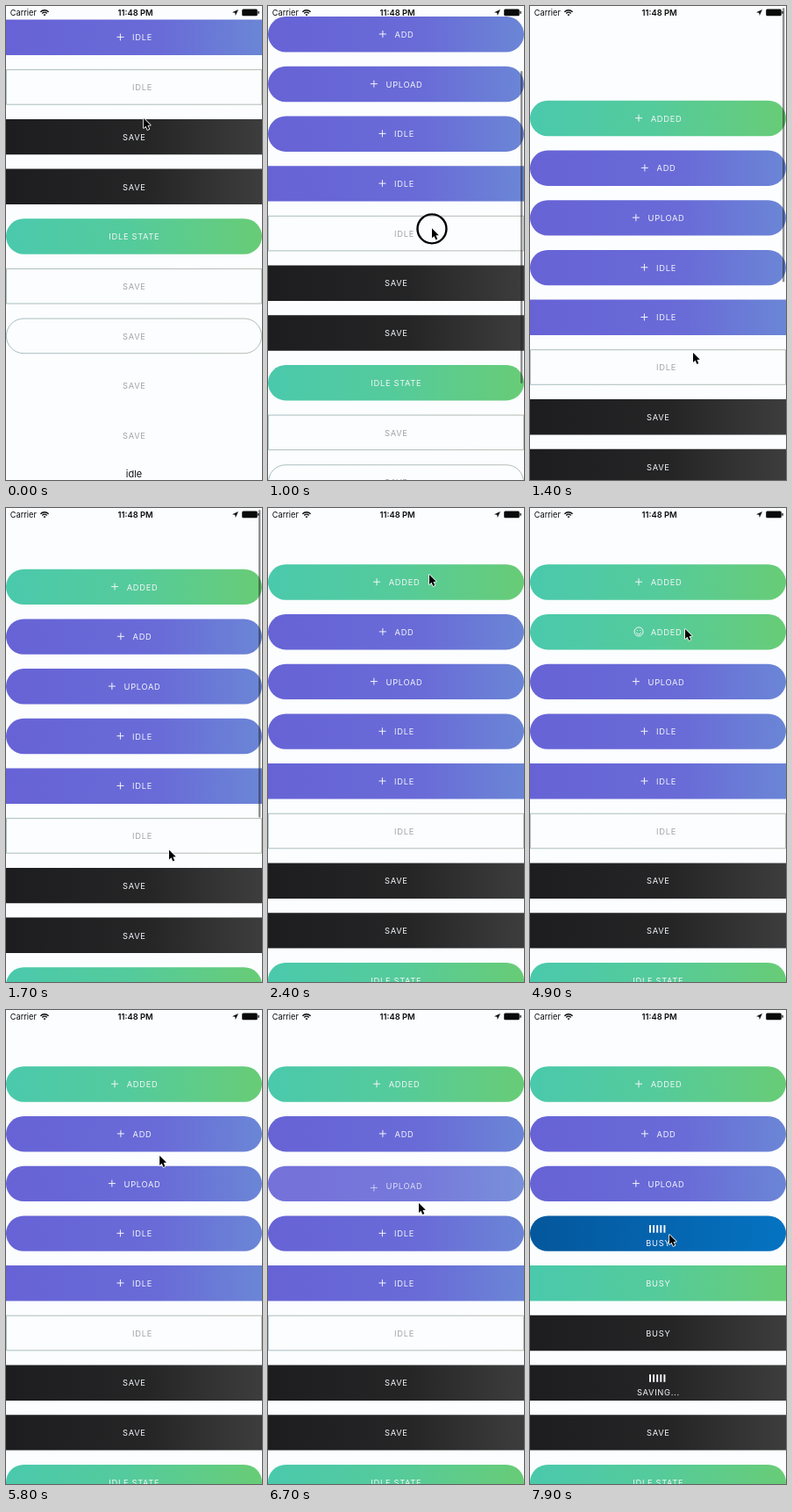
Animation, 292 px wide and 540 px high, one loop 8000 ms. Source, as an HTML page with a canvas:

```html
<!DOCTYPE html>
<html lang="en">
<head>
<meta charset="utf-8">
<title>Button states</title>
<style>
html, body { margin: 0; width: 100%; height: 100%; overflow: hidden; background: #fbfdfe; }
canvas { display: block; width: 292px; height: 540px; }
</style>
</head>
<body>
<canvas id="stage"></canvas>
<script>
const W = 292, H = 540, LOOP = 8000;
const PITCH = 56.7, BTN_H = 40.4, REST = 64.3;
const FONT = 'Inter, Roboto, sans-serif';
const canvas = document.getElementById('stage');
const ctx = canvas.getContext('2d');
const dpr = window.devicePixelRatio || 1;
canvas.width = W * dpr;
canvas.height = H * dpr;

const clamp = v => Math.max(0, Math.min(1, v));
const lerp = (a, b, p) => a + (b - a) * p;
const linear = p => p;
const easeOut = p => 1 - (1 - p) ** 2;
const easeOut3 = p => 1 - (1 - p) ** 3;
const smooth = p => p * p * (3 - 2 * p);
const span = (t, from, length) => clamp((t - from) / length);

// Keys are [time, value, easing into this key]
function track(keys, t) {
  let i = 1;
  while (i < keys.length - 1 && t > keys[i][0]) i++;
  const [t0, a] = keys[i - 1], [t1, b, ease = smooth] = keys[i];
  const p = ease(clamp((t - t0) / (t1 - t0)));
  return Array.isArray(a) ? a.map((v, k) => lerp(v, b[k], p)) : lerp(a, b, p);
}

const scrollKeys = [
  [0, -211.3], [80, -211.3], [1000, -45, smooth], [1400, 108, linear], [2000, REST, easeOut3]
];
const cursorKeys = [
  [0, [157, 128]], [80, [157, 128]], [1000, [187, 253]], [1400, [186, 395], linear],
  [1650, [186, 395]], [2300, [184, 76]], [3000, [184, 76]], [3700, [177, 138]],
  [5450, [177, 138]], [6200, [173, 200]], [6480, [173, 200]], [6700, [172, 220]],
  [7200, [159, 256]], [8000, [159, 256]]
];
const presses = [[950, 1380], [4050, 4170], [5200, 5320], [6370, 6480], [7240, 7350]];

const fills = {
  violet: [[0, '#6763d6'], [0.6, '#696bd7'], [1, '#6b86d6']],
  green: [[0, '#4ac9ac'], [0.5, '#55cb9b'], [1, '#68cc76']],
  dark: [[0, '#1d1d1f'], [0.55, '#252526'], [1, '#3d3d3d']],
  blue: [[0, '#04579c'], [0.5, '#0564ae'], [1, '#0573c2']],
  line: [[0, '#93acb0'], [1, '#a3ab9f']]
};

const look = (label, fill, opt = {}) => ({ label, fill, ink: '#f4f6fa', ...opt });
const grey = '#a1a4a3';

const add = look('ADD', 'violet', { icon: 'plus', round: true });
const added = look('ADDED', 'green', { icon: 'smile', round: true });
const upload = look('UPLOAD', 'violet', { icon: 'plus', round: true });

// Each button: first look, then [time, next look] changes
const buttons = [
  { first: look('ADDED', 'green', { icon: 'plus', round: true }) },
  { first: add, changes: [[4120, added], [5270, add]] },
  { first: upload, changes: [[6480, upload]], flash: 6400 },
  { first: look('IDLE', 'violet', { icon: 'plus', round: true }),
    changes: [[7300, look('BUSY', 'blue', { bars: true, round: true })]] },
  { first: look('IDLE', 'violet', { icon: 'plus' }), changes: [[7300, look('BUSY', 'green')]] },
  { first: look('IDLE', 'line', { ink: grey, icon: 'none', outline: true }),
    changes: [[7300, look('BUSY', 'dark')]] },
  { first: look('SAVE', 'dark'), changes: [[7300, look('SAVING...', 'dark', { bars: true })]] },
  { first: look('SAVE', 'dark') },
  { first: look('IDLE STATE', 'green', { round: true }) },
  { first: look('SAVE', 'line', { ink: grey, outline: true }) },
  { first: look('SAVE', 'line', { ink: grey, outline: true, round: true }) },
  { first: look('SAVE', null, { ink: grey }) },
  { first: look('SAVE', null, { ink: grey }) }
];

function gradient(name) {
  const g = ctx.createLinearGradient(0, 0, W, 0);
  fills[name].forEach(([at, color]) => g.addColorStop(at, color));
  return g;
}

function drawBody(state, y, alpha) {
  if (!state.fill || alpha <= 0) return;
  const inset = state.outline ? 0.4 : 0;
  ctx.globalAlpha = alpha;
  ctx.beginPath();
  ctx.roundRect(inset, y + inset, W - 2 * inset, BTN_H - 2 * inset,
    state.round ? BTN_H / 2 - inset : 0);
  if (state.outline) {
    ctx.lineWidth = 0.8;
    ctx.strokeStyle = gradient(state.fill);
    ctx.stroke();
  } else {
    ctx.fillStyle = gradient(state.fill);
    ctx.fill();
  }
  ctx.globalAlpha = 1;
}

function drawIcon(kind, x, y) {
  ctx.lineWidth = 1;
  ctx.beginPath();
  if (kind === 'plus') {
    ctx.moveTo(x - 4, y);
    ctx.lineTo(x + 4, y);
    ctx.moveTo(x, y - 4);
    ctx.lineTo(x, y + 4);
  } else {
    ctx.arc(x, y, 5, 0, Math.PI * 2);
    ctx.moveTo(x + 2.6, y + 0.8);
    ctx.arc(x, y + 0.4, 2.6, 0.15, Math.PI - 0.15);
    for (const eye of [-1.8, 1.8]) {
      ctx.moveTo(x + eye, y - 2);
      ctx.lineTo(x + eye, y - 1);
    }
  }
  ctx.stroke();
}

// text and icon hold a vertical shift and an opacity each
function drawLabel(state, cy, text, icon) {
  ctx.font = `400 9.3px ${FONT}`;
  ctx.letterSpacing = '0.7px';
  ctx.textAlign = 'left';
  ctx.fillStyle = ctx.strokeStyle = state.ink;
  const width = ctx.measureText(state.label).width - 0.7;
  const x = 146 + (state.icon ? 9.2 : 0) - width / 2;
  ctx.globalAlpha = text.alpha;
  ctx.fillText(state.label, x, cy + 3.7 + text.dy + (state.bars ? 10.3 : 0));
  ctx.globalAlpha = icon.alpha;
  if (state.icon && state.icon !== 'none') drawIcon(state.icon, x - 13.7, cy - 0.3 + icon.dy);
  if (state.bars) {
    for (let i = 0; i < 5; i++) ctx.fillRect(136 + i * 4.1, cy - 9.5 + icon.dy, 2, 8.6);
  }
  ctx.globalAlpha = 1;
  ctx.letterSpacing = '0px';
}

const leaving = p => ({ dy: -10 * p, alpha: clamp(1 - 3 * p) });
const entering = p => ({ dy: 14 * (1 - easeOut(p)), alpha: easeOut(p) });

function drawButton(button, y, t) {
  let old = null, now = button.first, start = -1000;
  for (const [at, next] of button.changes || []) {
    if (t >= at) { old = now; now = next; start = at; }
  }
  const p = span(t, start, 400), q = span(t, start + 60, 400);
  const cy = y + BTN_H / 2;
  const dim = button.flash
    ? 1 - 0.16 * span(t, button.flash, 80) * (1 - span(t, button.flash + 130, 400)) : 1;
  if (old && p < 1) {
    if (old.fill !== now.fill) drawBody(old, y, old.outline ? 1 - p : 1);
    drawBody(now, y, old.fill === now.fill ? dim : p);
    drawLabel(old, cy, leaving(p), leaving(p));
  } else {
    drawBody(now, y, dim);
  }
  drawLabel(now, cy, entering(p), entering(q));
}

function drawStatus() {
  ctx.fillStyle = ctx.strokeStyle = '#0a0a0a';
  ctx.textAlign = 'left';
  ctx.font = `400 9.2px ${FONT}`;
  ctx.fillText('Carrier', 4.8, 11);
  ctx.textAlign = 'center';
  ctx.font = `600 9.4px ${FONT}`;
  ctx.fillText('11:48 PM', 147.6, 11);

  ctx.lineWidth = 1.4;
  for (const r of [3.7, 6.3]) {
    ctx.beginPath();
    ctx.arc(44, 11, r, -Math.PI * 0.76, -Math.PI * 0.24);
    ctx.stroke();
  }
  ctx.beginPath();
  ctx.moveTo(44, 11.3);
  ctx.arc(44, 11.3, 2, -Math.PI * 0.76, -Math.PI * 0.24);
  ctx.fill();

  ctx.beginPath();
  ctx.moveTo(265, 4);
  ctx.lineTo(261.8, 11);
  ctx.lineTo(261.3, 7.7);
  ctx.lineTo(258, 7.2);
  ctx.fill();

  ctx.beginPath();
  ctx.roundRect(269.2, 3.4, 17.6, 7.8, 1.5);
  ctx.fill();
  ctx.fillRect(287.4, 6, 1.3, 2.8);
}

function drawScrollbar(top, t) {
  const alpha = span(t, 80, 120) * (1 - span(t, 2000, 250));
  if (!alpha) return;
  const offset = REST - top;
  const length = 356 + Math.min(0, offset);
  ctx.globalAlpha = alpha * 0.5;
  ctx.fillStyle = '#222';
  ctx.beginPath();
  ctx.roundRect(288, 2 + Math.max(0, offset * 0.66), 2.4, length, 1.2);
  ctx.fill();
  ctx.globalAlpha = 1;
}

function drawCursor(t) {
  const [x, y] = track(cursorKeys, t);
  if (presses.some(([a, b]) => t >= a && t < b)) {
    ctx.strokeStyle = '#000';
    ctx.lineWidth = 2.4;
    ctx.beginPath();
    ctx.arc(x, y + 0.5, 16.5, 0, Math.PI * 2);
    ctx.stroke();
  }
  ctx.save();
  ctx.translate(x, y);
  ctx.beginPath();
  for (const [px, py] of [[0, 0], [0, 11], [2.5, 8.8], [4.4, 13], [6.3, 12.1], [4.5, 8], [7.8, 7.8]]) {
    ctx.lineTo(px, py);
  }
  ctx.closePath();
  ctx.lineJoin = 'round';
  ctx.strokeStyle = '#fff';
  ctx.lineWidth = 1.6;
  ctx.stroke();
  ctx.fillStyle = '#000';
  ctx.fill();
  ctx.restore();
}

function draw(t) {
  ctx.setTransform(dpr, 0, 0, dpr, 0, 0);
  ctx.fillStyle = '#fbfdfe';
  ctx.fillRect(0, 0, W, H);
  const top = track(scrollKeys, t);
  buttons.forEach((button, i) => {
    const y = top + i * PITCH;
    if (y > -BTN_H && y < H) drawButton(button, y, t);
  });
  ctx.fillStyle = '#111';
  ctx.textAlign = 'center';
  ctx.font = `400 11px ${FONT}`;
  ctx.fillText('idle', 146, top + 748);
  drawScrollbar(top, t);
  drawStatus();
  drawCursor(t);
}

const begin = performance.now();
function tick() {
  draw((performance.now() - begin) % LOOP);
  requestAnimationFrame(tick);
}
tick();
</script>
</body>
</html>
```
